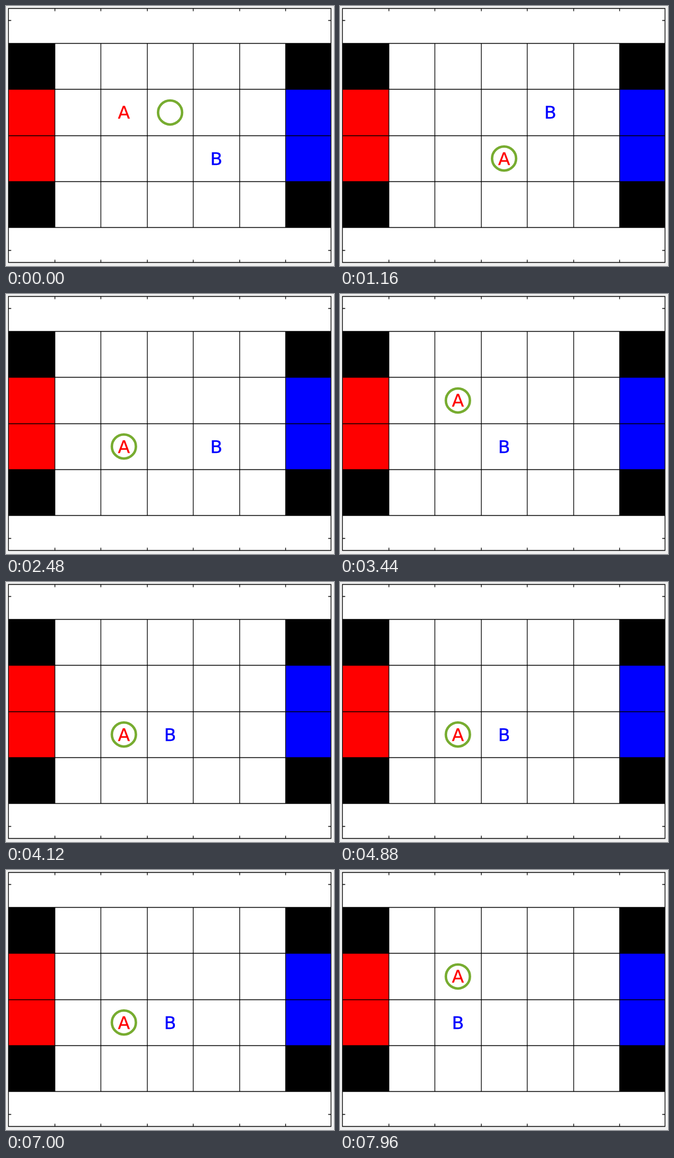
These frames come from a looping animation (600 by 476 pixels, 8000 ms). An HTML page:

```html
<!DOCTYPE html>
<html lang="en">
<head>
<meta charset="utf-8">
<title>Grid ball game</title>
<style>
  html, body { margin: 0; width: 100%; height: 100%; overflow: hidden; background: #f0f0f0; }
  svg { display: block; width: 600px; height: 476px; }
  text { font: 32px "DejaVu Sans", sans-serif; text-anchor: middle; stroke-width: 0.4; }
</style>
</head>
<body>
<svg viewBox="0 0 600 476">
  <rect x="4.5" y="4.5" width="590" height="465" fill="#fff"/>
  <g id="cells"></g>
  <path id="lines" fill="none" stroke="#000" stroke-width="1.3"/>
  <text id="a" y="11.4" fill="#f00" stroke="#f00">A</text>
  <text id="b" y="11.4" fill="#00f" stroke="#00f">B</text>
  <circle id="ball" r="22" fill="none" stroke="#77ac30" stroke-width="4.5"/>
</svg>
<script>
const TURN = 1000, FIRST_TURN = 120;
const EDGE = 4.5, RIGHT = 594.5, BOTTOM = 469.5;
const STEP = { L: [-1, 0], R: [1, 0], U: [0, -1], D: [0, 1], ".": [0, 0] };

// One letter per turn; a dot means the player stays
const playerA = { start: [2, 1], moves: "RDLUD..U" };
const playerB = { start: [4, 2], moves: ".UDL...L" };
const ballStart = [3, 1];
const LOOP = TURN * playerA.moves.length;

const byId = id => document.getElementById(id);
const colX = col => 4.9 + col * 84.5;
const rowY = row => 68.5 + row * 84.25;
const snap = value => Math.floor(value) + 0.5;

function drawBoard() {
  const block = (col, row, rows, fill) => {
    const x = snap(colX(col)), y = snap(rowY(row));
    const width = Math.min(snap(colX(col + 1)), RIGHT) - x;
    const height = snap(rowY(row + rows)) - y;
    return `<rect x="${x}" y="${y}" width="${width}" height="${height}" fill="${fill}"/>`;
  };
  byId("cells").innerHTML =
    block(0, 0, 4, "#000") + block(6, 0, 4, "#000") +
    block(0, 1, 2, "#f00") + block(6, 1, 2, "#00f");

  let d = `M${EDGE} ${EDGE}H${RIGHT}V${BOTTOM}H${EDGE}Z`;
  for (let row = 0; row <= 4; row++) d += `M${EDGE} ${snap(rowY(row))}H${RIGHT}`;
  for (let col = 1; col <= 6; col++) {
    const x = snap(colX(col));
    d += `M${x} ${EDGE}v5M${x} ${rowY(0)}V${rowY(4)}M${x} ${BOTTOM}v-5`;
  }
  for (const row of [-0.5, 4.5]) {
    const y = snap(rowY(row));
    d += `M${EDGE} ${y}h5M${RIGHT} ${y}h-5`;
  }
  byId("lines").setAttribute("d", d);
}

function position({ start, moves }, turns) {
  return [...moves.slice(0, turns)].reduce(
    ([col, row], move) => [col + STEP[move][0], row + STEP[move][1]], start);
}

function place(id, [col, row]) {
  byId(id).setAttribute("transform", `translate(${colX(col + 0.5) - 0.5} ${rowY(row + 0.5)})`);
}

function render(time) {
  const turns = Math.max(0, Math.floor((time % LOOP - FIRST_TURN) / TURN) + 1);
  const a = position(playerA, turns);
  place("a", a);
  place("b", position(playerB, turns));
  place("ball", turns ? a : ballStart);
}

function tick() {
  render(performance.now() - startTime);
  requestAnimationFrame(tick);
}

drawBoard();
const startTime = performance.now();
tick();
</script>
</body>
</html>
```
